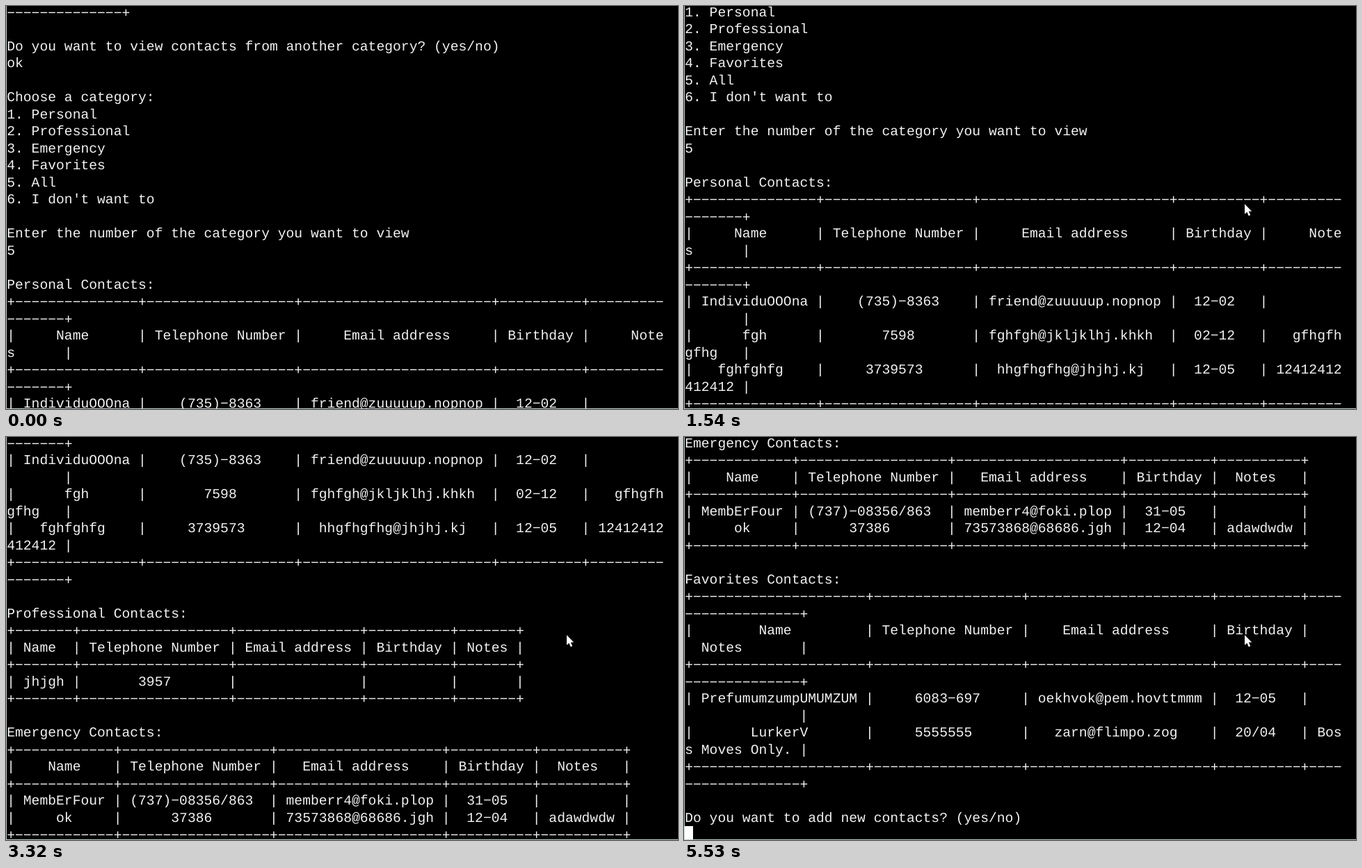
Animation, 966 px wide and 580 px high, one loop 6.39 s. Source, as an HTML page:

```html
<!DOCTYPE html>
<html lang="en">
<head>
<meta charset="utf-8">
<title>Contact book terminal</title>
<style>
  html, body { margin: 0; width: 100%; height: 100%; overflow: hidden; background: #000; }
  #stage { position: relative; width: 966px; height: 580px; overflow: hidden; background: #000; }
  #edge {
    position: absolute; inset: 0; box-sizing: border-box;
    border: solid #c3ccd0; border-width: 0 0 1px 1px;
  }
  #screen {
    position: absolute; left: 1.2px; top: -2.5px; margin: 0;
    font: 19.68px/24.52px "Liberation Mono", monospace;
    color: #f2f2f2; white-space: pre; text-rendering: geometricPrecision;
    font-variant-ligatures: none;
  }
  #screen div { height: 24.52px; }
  #screen .rule { position: relative; top: 1px; }
  #caret { position: absolute; left: 1px; top: 560px; width: 12px; height: 19px; background: #fff; }
  #pointer { position: absolute; left: 0; top: 0; overflow: visible; }
</style>
</head>
<body>
<div id="stage">
  <div id="screen"></div>
  <div id="caret"></div>
  <div id="edge"></div>
  <svg id="pointer" width="12" height="19">
    <path d="M0 0V14.5L3.3 11.4 5.8 17 8.2 16 5.8 10.4H10.2Z" fill="#fff" stroke="#000" paint-order="stroke"/>
  </svg>
</div>
<script>
const LOOP = 6390, COLUMNS = 80, ROWS = 24;
const HEAD = ['Name', 'Telephone Number', 'Email address', 'Birthday', 'Notes'];

const wrap = line => line.match(new RegExp(`.{1,${COLUMNS}}`, 'g'));

function center(text, width) {
  const left = Math.floor((width - text.length) / 2);
  return ' '.repeat(left) + text + ' '.repeat(width - text.length - left);
}

function table(title, rows) {
  const widths = HEAD.map((h, i) => 2 + Math.max(...[HEAD, ...rows].map(r => r[i].length)));
  const rule = '+' + widths.map(w => '-'.repeat(w) + '+').join('');
  const line = r => '|' + r.map((c, i) => center(c, widths[i]) + '|').join('');
  const body = [rule, line(HEAD), rule, ...rows.map(line), rule];
  return [title + ' Contacts:', ...body.flatMap(wrap), ''];
}

// The wide minus sign gives the long dashes of the console font.
const lines = [
  '-'.repeat(14) + '+', '',
  'Do you want to view contacts from another category? (yes/no)', 'ok', '',
  'Choose a category:',
  ...['Personal', 'Professional', 'Emergency', 'Favorites', 'All', "I don't want to"]
    .map((name, i) => `${i + 1}. ${name}`),
  '', 'Enter the number of the category you want to view', '5', '',
  ...table('Personal', [
    ['IndividuOOOna', '(735)-8363', 'friend@zuuuuup.nopnop', '12-02', ''],
    ['fgh', '7598', 'fghfgh@jkljklhj.khkh', '02-12', 'gfhgfhgfhg'],
    ['fghfghfg', '3739573', 'hhgfhgfhg@jhjhj.kj', '12-05', '12412412412412'],
  ]),
  ...table('Professional', [['jhjgh', '3957', '', '', '']]),
  ...table('Emergency', [
    ['MembErFour', '(737)-08356/863', 'memberr4@foki.plop', '31-05', ''],
    ['ok', '37386', '73573868@68686.jgh', '12-04', 'adawdwdw'],
  ]),
  ...table('Favorites', [
    ['PrefumumzumpUMUMZUM', '6083-697', 'oekhvok@pem.hovttmmm', '12-05', ''],
    ['LurkerV', '5555555', 'zarn@flimpo.zog', '20/04', 'Boss Moves Only.'],
  ]),
  'Do you want to add new contacts? (yes/no)', '',
].map(line => line.replaceAll('-', '\u2212'));

// Each wheel notch scrolls five and a half lines, rounded up.
const notches = [1540, 2080, 2680, 3320, 3970, 4930, 5530];
const NOTCH_LINES = 5.5;

const moves = [
  { start: 50, end: 570, steps: 15,
    path: [[0, 911, 565], [0.4, 881, 468], [0.75, 848, 388], [0.87, 843, 379], [1, 847, 390]] },
  { start: 780, end: 1060, steps: 10,
    path: [[0, 847, 390], [0.5, 825, 332], [0.8, 810, 296], [1, 806, 285]] },
];

function along(path, p) {
  const i = Math.max(1, path.findIndex(point => point[0] >= p));
  const [p0, x0, y0] = path[i - 1], [p1, x1, y1] = path[i];
  const k = (p - p0) / (p1 - p0);
  return [x0 + (x1 - x0) * k, y0 + (y1 - y0) * k].map(Math.round);
}

function pointerAt(t) {
  const move = moves.findLast(m => t >= m.start);
  if (!move) return null;
  const { start, end, steps, path } = move;
  const step = Math.floor((t - start) / (end - start) * (steps - 1) + 1e-6);
  return along(path, Math.min(1, (step + 1) / steps));
}

function lineElement(text) {
  const element = document.createElement('div');
  element.textContent = text;
  element.classList.toggle('rule', /^[+\u2212]+$/.test(text));
  return element;
}

const [screen, caret, pointer] = ['screen', 'caret', 'pointer'].map(id => document.getElementById(id));
let shownTop = -1;

function draw(t) {
  const count = notches.filter(time => t >= time).length;
  const top = Math.ceil(count * NOTCH_LINES);
  if (top !== shownTop) {
    screen.replaceChildren(...lines.slice(top, top + ROWS).map(lineElement));
    caret.hidden = count < notches.length;
    shownTop = top;
  }
  const at = pointerAt(t);
  pointer.style.visibility = at ? 'visible' : 'hidden';
  if (at) pointer.style.transform = `translate(${at[0]}px, ${at[1]}px)`;
}

const begin = performance.now();
function tick() {
  draw((performance.now() - begin) % LOOP);
  requestAnimationFrame(tick);
}
tick();
</script>
</body>
</html>
```
